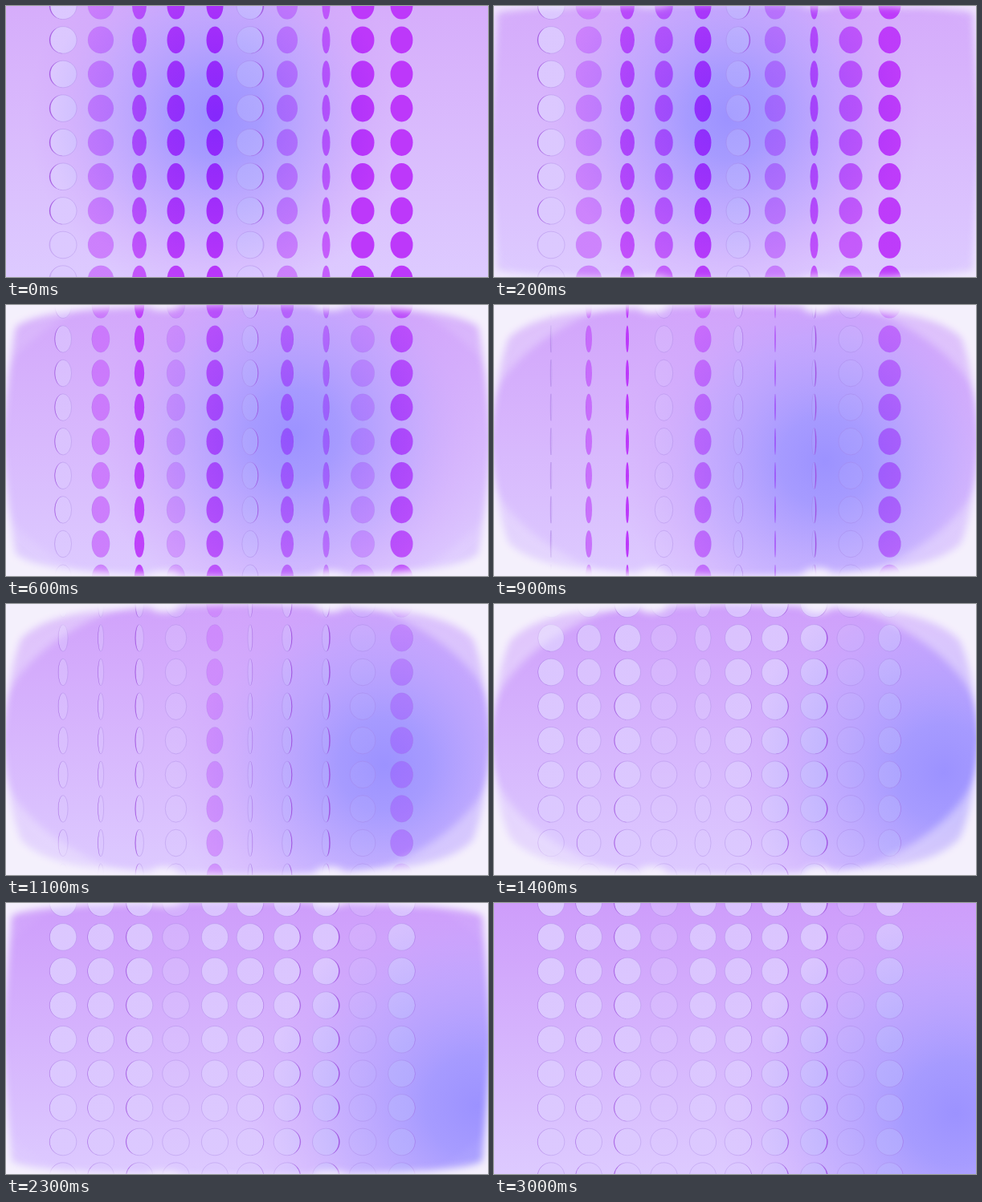
Animation, 600 px wide and 338 px high, one loop 4900 ms. Source, as an HTML page:

```html
<!DOCTYPE html>
<html lang="en">
<head>
<meta charset="utf-8">
<title>Flipping dots</title>
<style>
html, body { margin: 0; width: 100%; height: 100%; overflow: hidden; background: #d6b4fc; }
svg { display: block; width: 100vw; height: 100vh; }
</style>
</head>
<body>
<svg viewBox="0 0 600 338" preserveAspectRatio="none">
  <defs>
    <linearGradient id="base" x1="0" y1="0" x2="0" y2="1">
      <stop id="top" offset="0"/>
      <stop offset="1" stop-color="#ddcaff"/>
    </linearGradient>
    <radialGradient id="glow" class="follow" gradientUnits="userSpaceOnUse">
      <stop offset="0" stop-color="#9c92ff"/>
      <stop offset=".22" stop-color="#a298ff" stop-opacity=".92"/>
      <stop offset=".6" stop-color="#b9a2ff" stop-opacity=".55"/>
      <stop offset=".82" stop-color="#cba2fc" stop-opacity=".24"/>
      <stop offset="1" stop-color="#cfa2fc" stop-opacity="0"/>
    </radialGradient>
    <radialGradient id="light" class="follow" gradientUnits="userSpaceOnUse">
      <stop offset="0" stop-color="#aba4ff"/>
      <stop offset=".4" stop-color="#b8b0ff"/>
      <stop offset=".9" stop-color="#dcc9ff"/>
    </radialGradient>
    <radialGradient id="dark" class="follow" gradientUnits="userSpaceOnUse">
      <stop offset="0" stop-color="#8528fc"/>
      <stop offset=".35" stop-color="#9a2bfa"/>
      <stop offset=".9" stop-color="#bd38fa"/>
    </radialGradient>
    <filter id="soft" filterUnits="userSpaceOnUse" x="-60" y="-60" width="720" height="458">
      <feGaussianBlur stdDeviation="5"/>
    </filter>
    <g id="corner">
      <path id="edge"/>
      <ellipse class="bump" cx="85" rx="16"/>
      <ellipse class="bump" cx="197" rx="20"/>
    </g>
  </defs>
  <rect width="600" height="338" fill="url(#base)"/>
  <rect width="600" height="338" fill="url(#glow)"/>
  <g id="dots"></g>
  <path id="halo" fill="#f1eafd" fill-rule="evenodd" filter="url(#soft)"/>
  <g id="frame" fill="#f4f0fc" filter="url(#soft)">
    <use href="#corner"/>
    <use href="#corner" transform="translate(600 0) scale(-1 1)"/>
    <use href="#corner" transform="translate(0 338) scale(1 -1)"/>
    <use href="#corner" transform="translate(600 338) scale(-1 -1)"/>
  </g>
</svg>
<script>
const LOOP = 4900, STEP = 100, R = 16.8, ROWS = 9;
const TIMES = [0, 400, 900, 1400, 1900];
// half widths (negative = turned over), tint strength, face opacity, rim at start and end
const COLS = [
  { x: 71, w: [17, 17, .8, -16.3, -16.8], p: [0, 0, 0, 0, 0], face: .95, rim: [-1.3, -.3] },
  { x: 118, w: [16, 16, 4, -15, -16.5], p: [.5, .45, .6, 0, 0], face: .9, rim: [0, -.4] },
  { x: 166, w: [9, 9, 2, -16.5, -16.8], p: [.8, .88, 1, 0, 0], face: .9, rim: [0, -.9] },
  { x: 211.5, w: [11, 11.5, 11.2, 16.3, 16.8], p: [.95, .5, 0, 0, 0], face: .42, rim: [0, 0] },
  { x: 260, w: [10.5, 10.5, 10.5, 10, 16.6], p: [1, .9, .6, 0, 0], face: .9, rim: [0, 0] },
  { x: 304, w: [17, 13, 6, -16.5, -16.8], p: [0, 0, 0, 0, 0], face: .85, rim: [1.5, .3] },
  { x: 350, w: [13, 13, .7, -16.8, -16.8], p: [.5, .5, .8, 0, 0], face: .9, rim: [0, 1] },
  { x: 398.5, w: [5, 5, 2.8, -17, -17], p: [.75, .9, 0, 0, 0], face: .9, rim: [0, 1.4] },
  { x: 444, w: [14.5, 14.5, 15, 17, 17], p: [1, .5, 0, 0, 0], face: .3, rim: [0, 0] },
  { x: 492.5, w: [14, 14, 14, 14, 16.8], p: [1, .95, .6, 0, 0], face: .85, rim: [0, .2] }
];

const $ = id => document.getElementById(id);
const mix = (a, b, k) => a + (b - a) * k;
const set = (el, attrs) => { for (const k in attrs) el.setAttribute(k, attrs[k]); };

function track(t, times, values) {
  let i = 1;
  while (i < times.length - 1 && t > times[i]) i++;
  const k = (t - times[i - 1]) / (times[i] - times[i - 1]);
  return mix(values[i - 1], values[i], Math.min(1, Math.max(0, k)));
}

function add(tag, attrs) {
  const el = document.createElementNS('http://www.w3.org/2000/svg', tag);
  set(el, attrs);
  return $('dots').appendChild(el);
}

const dots = [];
for (const col of COLS) {
  for (let row = 0; row < ROWS; row++) {
    const y = -.2 + row * 42.6;
    const at = { cx: col.x, cy: y, ry: R };
    dots.push({
      col, row, y,
      face: add('ellipse', { ...at, fill: 'url(#light)' }),
      tint: add('ellipse', { ...at, fill: 'url(#dark)' }),
      line: add('ellipse', { ...at, fill: 'none', stroke: '#a07ade', 'stroke-width': .6 }),
      rim: add('path', { fill: '#9c40dc' })
    });
  }
}

function crescent(x, y, w, d) {
  const inner = Math.max(0.1, w - Math.abs(d)), side = d > 0 ? 1 : 0;
  return `M${x} ${y - R}A${w} ${R} 0 0 ${side} ${x} ${y + R}A${inner} ${R} 0 0 ${1 - side} ${x} ${y - R}Z`;
}

function drawDots(t) {
  for (const { col, row, y, face, tint, line, rim } of dots) {
    const turn = track(t, TIMES, col.w), w = Math.max(.6, Math.abs(turn));
    const p = turn < 0 ? 0 : track(t, TIMES, col.p);
    const open = Math.min(1, w / R);
    const d = track(t, [0, 400, 900], [col.rim[0], mix(...col.rim, .3), col.rim[1]]);
    set(face, { rx: w, cx: col.x + .7 * p, opacity: col.face * (.4 + .6 * open * open) });
    set(tint, { rx: w, opacity: p });
    set(line, { rx: w, opacity: .55 * (1 - p) });
    set(rim, {
      d: crescent(col.x, y, w, d),
      opacity: d ? (t < 900 && row > 6 ? .15 : .8) * (1 - p) : 0
    });
  }
}

function drawGlow(t) {
  const times = [0, 400, 900, 1400, 1900, 2300, 2700];
  const cx = track(t, times, [262, 325, 412, 560, 592, 586, 575]);
  const cy = track(t, times, [138, 137, 195, 210, 240, 253, 262]);
  const r = track(t, times, [235, 245, 255, 275, 285, 290, 295]);
  for (const g of document.querySelectorAll('.follow')) set(g, { cx, cy, r });
  const k = Math.min(1, t / 1600);
  $('top').setAttribute('stop-color', `rgb(${mix(214, 206, k)},${mix(173, 157, k)},251)`);
}

function drawFrame(t) {
  const a = track(t, [0, 400, 900, 1400, 1900, 2300, 2700], [0, .4, .9, 1, .75, .35, 0]);
  const m = 5 * a - 5;
  set($('edge'), {
    d: `M-40 -40V169H-5Q${4 * a} 80 ${20 * a} ${46 * a}Q${34 * a + 10} ${20 * a} 100 ${13 * a - 2}` +
       `Q190 ${m + 2} 301 ${m}V-40Z`
  });
  for (const b of document.querySelectorAll('.bump')) set(b, { ry: 11 * a });
  set($('frame'), { opacity: Math.min(1, a * 4) });
  const rx = 309 + 60 * (1 - a), ry = 186 + 60 * (1 - a);
  set($('halo'), {
    d: `M-40 -40H640V378H-40ZM${300 - rx} 169a${rx} ${ry} 0 1 0 ${2 * rx} 0a${rx} ${ry} 0 1 0 ${-2 * rx} 0Z`,
    opacity: .5 * a * a
  });
}

function draw(now) {
  const t = Math.floor((now % LOOP) / STEP) * STEP;
  drawGlow(t);
  drawDots(t);
  drawFrame(t);
}

let start = null;
function tick(now) {
  if (start === null) start = now;
  draw(now - start);
  requestAnimationFrame(tick);
}
draw(0);
requestAnimationFrame(tick);
</script>
</body>
</html>
```
